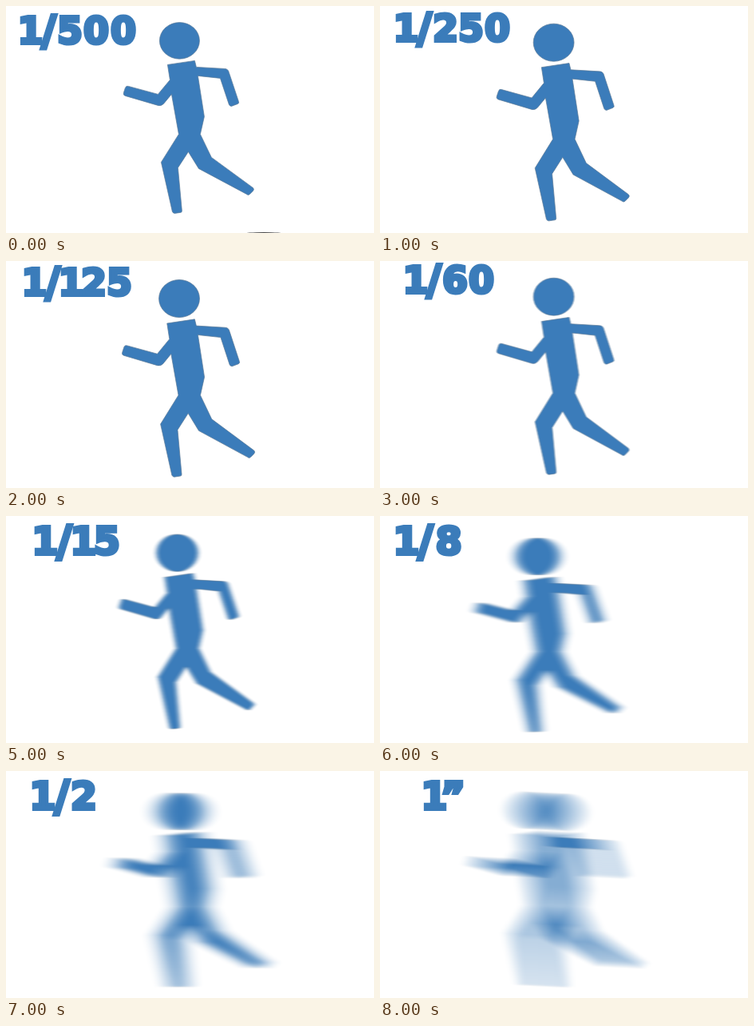
An HTML page with a canvas for the animation above (9 s loop, 461 by 284 pixels).

```html
<!DOCTYPE html>
<html lang="en">
<head>
<meta charset="utf-8">
<title>Shutter speed and motion blur</title>
<style>
  html, body { margin: 0; width: 100%; height: 100%; overflow: hidden; background: #fff; }
  canvas, svg { position: absolute; left: 0; top: 0; width: 461px; height: 284px; }
  text {
    font-family: "DejaVu Sans", sans-serif; font-weight: 700; text-anchor: middle;
    fill: #3b7cba; stroke: #3b7cba; stroke-width: 4px; stroke-linejoin: miter;
  }
</style>
</head>
<body>
<canvas id="stage" width="461" height="284"></canvas>
<svg viewBox="0 0 461 284"><g id="label"></g></svg>
<script>
const W = 461, H = 284, STEP = 1000, BLUE = '#3b7cba';
const SVG = 'http://www.w3.org/2000/svg';
const stage = document.getElementById('stage').getContext('2d');
const label = document.getElementById('label');

const buffer = document.createElement('canvas');
buffer.width = W;
buffer.height = H;
const ink = buffer.getContext('2d', { willReadFrequently: true });

// x, y: label origin; fx, fy: figure [scale, offset]; blur: widths of the averaging passes
const shots = [
  { text: '1/500', x: 18, y: 49, size: 1, fx: [1, 0.4], fy: [1, 0.4], blur: [], shadow: true },
  { text: '1/250', x: 20, y: 46, size: 1, fx: [1.018, -3.3], fy: [1.033, 1.3], blur: [] },
  { text: '1/125', x: 23, y: 45, size: 1, fx: [1.018, -3.9], fy: [1.033, 2.6], blur: [] },
  { text: '1/60', x: 32, y: 42, size: 1, fx: [1.015, -2.6], fy: [1.03, 0.4], blur: [3] },
  { text: '1/30', x: 36, y: 44, size: 1, fx: [1.015, -2.2], fy: [1.03, 0.8], blur: [3, 3] },
  { text: '1/15', x: 36, y: 50, size: 1.04, fx: [1.03, -9], fy: [1.02, 2.3], blur: [7, 7] },
  { text: '1/8', x: 20, y: 50, size: 1.04, fx: [1.09, -39], fy: [1.017, 7], blur: [15, 15] },
  { text: '1/2', x: 33, y: 50, size: 1.04, fx: [1.1, -19.5], fy: [1.017, 7], blur: [27, 27], tilt: 0.01 },
  { text: '1”', x: 55, y: 50, size: 1.04, fx: [1.06, -22], fy: [1.014, 6.7], blur: [63, 11], tilt: 0.05 }
];

const body = new Path2D(`M202 73 L236 68 L238 76 L273 78 Q278 78 279 83 L291 119
  Q292 121 290 122 L282 125 Q280 125 279 123 L268 90 L240 87 L248 138 L243 160
  L257 189 L309 227 Q311 229 309 231 L305 235 Q303 237 301 235 L241 203 L228 182
  L215 202 L220 256 Q220 258 218 258 L211 259 Q209 259 208 257 L194 195 L216 160
  L207 110 L197 122 Q194 125 190 124 L149 112 Q146 111 147 108 L149 102
  Q150 99 153 100 L190 110 L205 92 Z`);
const head = new Path2D();
head.ellipse(217, 43, 25, 22.8, 0, 0, Math.PI * 2);

function drawFigure({ fx, fy, tilt = 0 }) {
  ink.setTransform(1, 0, 0, 1, 0, 0);
  ink.fillStyle = '#fff';
  ink.fillRect(0, 0, W, H);
  const middle = fx[0] * 217 + fx[1];
  ink.setTransform(1, -tilt, 0, 1, 0, tilt * middle);
  ink.transform(fx[0], 0, 0, fy[0], fx[1], fy[1]);
  ink.fillStyle = BLUE;
  ink.strokeStyle = '#5b7a98';
  ink.lineWidth = 0.7;
  for (const part of [head, body]) {
    ink.fill(part);
    ink.stroke(part);
  }
  return middle;
}

// Sliding-window average along each row
function streak(width) {
  const image = ink.getImageData(0, 0, W, H);
  const out = image.data, src = out.slice(), half = (width - 1) / 2;
  for (let y = 0; y < H; y++) {
    for (let c = 0; c < 3; c++) {
      const at = x => src[(y * W + Math.max(0, Math.min(W - 1, x))) * 4 + c];
      let sum = 0;
      for (let x = -half; x <= half; x++) sum += at(x);
      for (let x = 0; x < W; x++) {
        out[(y * W + x) * 4 + c] = Math.round(sum / width);
        sum += at(x + half + 1) - at(x - half);
      }
    }
  }
  ink.putImageData(image, 0, 0);
}

function drawLabel({ text, x, y, size }) {
  const advance = { '1': 25, '/': 21, '0': 34, '8': 35, '”': 20 };
  label.replaceChildren();
  for (const char of text) {
    const slash = char === '/';
    const width = (advance[char] || 32) * size;
    const glyph = document.createElementNS(SVG, 'text');
    glyph.setAttribute('x', x + width / 2);
    glyph.setAttribute('y', slash ? y : y - 2);
    glyph.setAttribute('font-size', (slash ? 52 : 46) * size);
    glyph.textContent = char;
    label.append(glyph);
    x += width;
  }
}

function show(shot) {
  const { tilt = 0 } = shot;
  const middle = drawFigure(shot);
  shot.blur.forEach(streak);
  stage.setTransform(1, 0, 0, 1, 0, 0);
  stage.fillStyle = '#fff';
  stage.fillRect(0, 0, W, H);
  stage.setTransform(1, tilt, 0, 1, 0, -tilt * middle);
  stage.drawImage(buffer, 0, 0);
  if (shot.shadow) {
    stage.fillStyle = '#4a4a4a';
    stage.beginPath();
    stage.ellipse(323, 285, 25, 2, 0, 0, Math.PI * 2);
    stage.fill();
  }
  drawLabel(shot);
}

let current = -1;
const start = performance.now();
function tick() {
  const index = Math.floor((performance.now() - start) / STEP) % shots.length;
  if (index !== current) show(shots[current = index]);
  requestAnimationFrame(tick);
}
tick();
</script>
</body>
</html>
```
